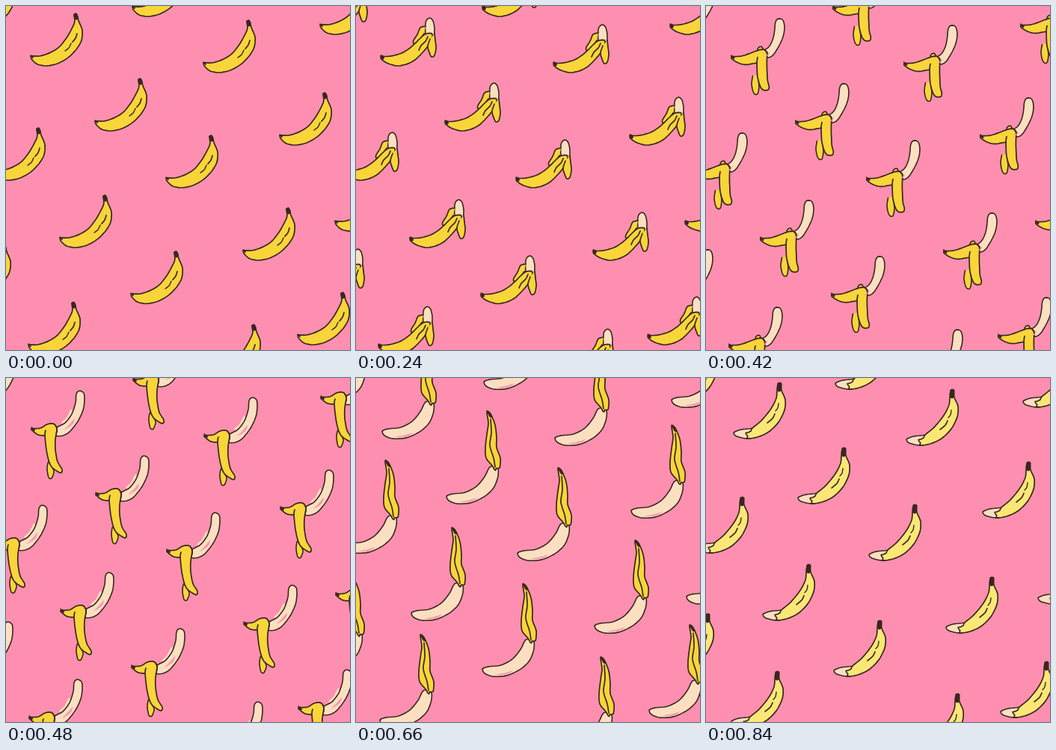
Animation of 460x460 px, one loop 900 ms. Source, as an HTML page:

```html
<!DOCTYPE html>
<html lang="en">
<head>
<meta charset="utf-8">
<title>Bananas</title>
<style>
  html, body { margin: 0; width: 100%; height: 100%; overflow: hidden; background: #ff8fb0; }
  svg { display: block; width: 460px; height: 460px; }
</style>
</head>
<body>
<svg id="stage" viewBox="0 0 460 460">
  <defs><g id="banana" stroke-linejoin="round" stroke-linecap="round"></g></defs>
</svg>
<script>
const NS = "http://www.w3.org/2000/svg";
const INK = "#38271f", PINK = "#ff8fb0", CREAM = "#fbdfc0";
const STEP = 60, STEPS = 15, SAMPLES = 56;

const spots = "33,68 264,77 119,155 366,174 214,231 -17,221 72,311 317,328 167,386 " +
  "30,454 390,441 271,484 440,289 420,26 169,2 -63,377 -59,21";

// Drawing order; open parts keep their ends unstroked.
const styles = {
  blob:  { fill: CREAM },
  flesh: { fill: CREAM, ink: 1.6 },
  flapL: { fill: "peel", ink: 1.7, open: true },
  legL:  { fill: "peel", ink: 1.6, open: true },
  body:  { fill: "peel", ink: 1.7 },
  legR:  { fill: "peel", ink: 1.7, open: true },
  pink:  { fill: PINK },
  knot:  { fill: "#f9a8a0", ink: 1.7 },
  line:  { fill: "none", ink: 1.7, open: true },
  line2: { fill: "none", ink: 1.4, open: true },
  stem:  { fill: INK, ink: 0.8 },
  tip:   { fill: INK, ink: 0.8 }
};

const pts = s => s.split(" ").map(p => p.split(",").map(Number));
const mix = (a, b, k) => a + (b - a) * k;

// Smooth curve through the points, resampled at equal distances.
function curve(p, open) {
  const n = p.length, dense = [];
  const at = i => open ? p[Math.max(0, Math.min(n - 1, i))] : p[(i + n) % n];
  const spans = open ? n - 1 : n;
  for (let i = 0; i < spans; i++) {
    const [a, b, c, d] = [at(i - 1), at(i), at(i + 1), at(i + 2)];
    for (let j = 0; j < 8; j++) {
      const t = j / 8;
      dense.push([0, 1].map(x => b[x] + 0.42 * t * (c[x] - a[x]
        + t * (2 * a[x] - 5 * b[x] + 4 * c[x] - d[x]
        + t * (3 * (b[x] - c[x]) + d[x] - a[x])))
        + 0.16 * t * t * (3 - 2 * t) * (c[x] - b[x])));
    }
  }
  dense.push(at(spans));
  const len = [0];
  for (let i = 1; i < dense.length; i++)
    len.push(len[i - 1] + Math.hypot(dense[i][0] - dense[i - 1][0], dense[i][1] - dense[i - 1][1]));
  const out = [], total = len[len.length - 1];
  for (let s = 0, i = 1; s <= SAMPLES; s++) {
    const want = total * s / SAMPLES;
    while (i < dense.length - 1 && len[i] < want) i++;
    const k = (want - len[i - 1]) / (len[i] - len[i - 1] || 1);
    out.push([0, 1].map(x => mix(dense[i - 1][x], dense[i][x], k)));
  }
  return out;
}

function pose(step, parts, peel = [249, 213, 58]) {
  const shapes = {};
  for (const key in parts) shapes[key] = curve(pts(parts[key]), styles[key].open);
  return { step, shapes, peel };
}

const whole = pose(0, {
  body: "0,-1 12,-1 27,-6 39,-14 49,-27 55,-38 59,-47 58,-57 62,-57 64,-48 69,-36 68,-22 61,-10 50,1 36,9 21,12 9,10 2,4",
  line: "62,-31 60,-25 56,-20",
  line2: "54,-18 51,-12 46,-8",
  stem: "58,-57 61,-58 63,-53 62,-50 59,-51",
  tip: "0,-2 3,-1 3,2"
});
const loose = pose(2, {
  body: "1,-1 13,-1 28,-5 40,-13 49,-24 56,-36 61,-47 62,-54 65,-54 66,-47 70,-34 69,-22 62,-9 51,2 37,9 21,12 10,10 3,4",
  pink: "11,5 18,3 26,3 17,6",
  line: "63,-28 61,-21 54,-12",
  knot: "57,-54 63,-57 69,-56 69,-52 65,-52 61,-49",
  tip: "1,-2 4,-1 4,2"
});
const opening = pose(4, {
  flesh: "60,-32 60,-45 62,-50 66,-52 70,-48 72,-38 71,-28 66,-24",
  flapL: "60,-41 53,-39 49,-30 44,-22 44,-18 49,-18 54,-25 58,-31",
  body: "0,0 14,-1 28,-5 38,-11 46,-18 55,-27 61,-31 69,-31 68,-24 64,-16 58,-8 46,4 34,10 22,12 10,9 2,4",
  legR: "72,-31 73,-22 74,-12 72,-2 68,0 65,-6 63,-14 66,-24",
  line: "51,-9 54,-15 60,-21 63,-27",
  tip: "0,-2 4,-1 4,3 1,2"
});
const half = pose(6, {
  blob: "60,-8 68,-10 70,-15 63,-17",
  flesh: "48,-10 56,-19 58,-30 58,-44 62,-51 68,-52 72,-46 72,-34 67,-18 62,-8",
  flapL: "36,-10 38,-14 42,-17 47,-17 50,-12",
  legL: "48,4 45,20 44,33 40,34 36,28 34,18 36,6",
  body: "1,0 15,-1 36,-6 48,-11 57,-14 63,-9 54,6 41,8 26,12 11,9 2,4",
  legR: "57,-14 63,-10 64,8 61,24 58,34 54,33 50,20 51,6 52,-1",
  tip: "0,-2 4,0 4,3 1,1"
});
const bare = pose(8, {
  blob: "41,-8 48,-15 54,-26 57,-22 50,-8",
  flesh: "34,-1 46,-8 55,-20 60,-35 61,-47 65,-51 71,-48 72,-38 70,-25 63,-10 52,4 43,9 34,9",
  legL: "24,44 31,56 28,66 24,65 22,54 23,45",
  body: "1,0 13,-1 22,-6 30,-7 35,-1 33,8 20,9 10,8 3,3",
  legR: "32,-6 35,0 33,14 33,28 36,44 42,54 41,59 36,57 28,51 24,42 21,28 19,9 20,2",
  pink: "45,1 52,-6 59,-14 56,-6",
  tip: "1,-2 5,0 5,3 2,1"
});
const capped = pose(11, {
  flesh: "2,3 10,0 27,-2 42,-10 53,-23 60,-36 70,-36 71,-24 65,-8 52,4 34,12 16,13 5,9",
  body: "56,-110 61,-107 67,-92 69,-75 69,-62 74,-48 73,-34 69,-35 67,-31 63,-38 55,-48 54,-62 56,-80 58,-95",
  pink: "19,11 34,8 43,5 35,10",
  line: "61,-100 62,-82 60,-65 65,-48 67,-36",
  stem: "56,-111 59,-110 63,-103 60,-103"
});
const dressed = pose(14, {
  flesh: "4,5 14,1 29,-1 42,-8 54,-21 58,-26 66,-22 62,-9 50,3 36,10 22,13 8,10",
  body: "63,-59 67,-59 68,-51 73,-39 72,-25 64,-9 51,4 36,11 22,13 23,9 19,6 26,4 29,-1 41,-11 54,-27 61,-41 62,-51",
  line: "59,-20 56,-14 49,-8",
  line2: "64,-34 63,-28 60,-24",
  stem: "63,-61 68,-61 67,-51 63,-51"
}, [250, 231, 118]);

const move = (p, keys, dx, dy) => Object.fromEntries(keys.filter(k => p.shapes[k])
  .map(k => [k, p.shapes[k].map(([x, y]) => [x + dx, y + dy])]));
const flesh = capped.shapes.flesh;
const falling = { step: 9, peel: bare.peel,
  shapes: { flesh, ...move(bare, ["body", "legL", "legR", "tip"], -2, 30) } };
const landing = { step: 10, peel: capped.peel,
  shapes: { flesh, ...move(capped, ["body", "line", "stem"], -2, -36) } };

const poses = [whole, loose, opening, half, bare, falling, landing, capped, dressed];

// A part missing on one side grows from, or shrinks to, its first point.
function blend(a, b, k) {
  if (!a && !b || !a && k === 0 || !b && k === 1) return null;
  const from = a || b.map(() => b[0]), to = b || a.map(() => a[0]);
  return from.map((p, i) => [mix(p[0], to[i][0], k), mix(p[1], to[i][1], k)]);
}

function add(tag, parent, attrs) {
  const el = document.createElementNS(NS, tag);
  for (const name in attrs) el.setAttribute(name, attrs[name]);
  return parent.appendChild(el);
}

const stage = document.getElementById("stage");
const banana = document.getElementById("banana");
const paths = {};
for (const key in styles) {
  const s = styles[key];
  paths[key] = add("path", banana, { fill: s.fill === "peel" ? "#f9d53a" : s.fill,
    stroke: s.ink ? INK : "none", "stroke-width": s.ink || 0 });
}
for (const [x, y] of pts(spots)) add("use", stage, { href: "#banana", x, y });

function draw(step) {
  let i = poses.length - 1;
  while (poses[i].step > step) i--;
  const a = poses[i], b = poses[i + 1] || a;
  const k = a === b ? 0 : (step - a.step) / (b.step - a.step);
  const peel = `rgb(${a.peel.map((c, j) => Math.round(mix(c, b.peel[j], k)))})`;
  for (const key in styles) {
    const s = styles[key], shape = blend(a.shapes[key], b.shapes[key], k);
    paths[key].setAttribute("d", shape
      ? "M" + shape.map(p => p[0].toFixed(1) + " " + p[1].toFixed(1)).join("L") + (s.open ? "" : "Z") : "");
    if (s.fill === "peel") paths[key].setAttribute("fill", peel);
  }
}

let start = null, shown = 0;
draw(0);
function tick(now) {
  if (start === null) start = now;
  const step = Math.floor((now - start) / STEP) % STEPS;
  if (step !== shown) draw(shown = step);
  requestAnimationFrame(tick);
}
requestAnimationFrame(tick);
</script>
</body>
</html>
```
